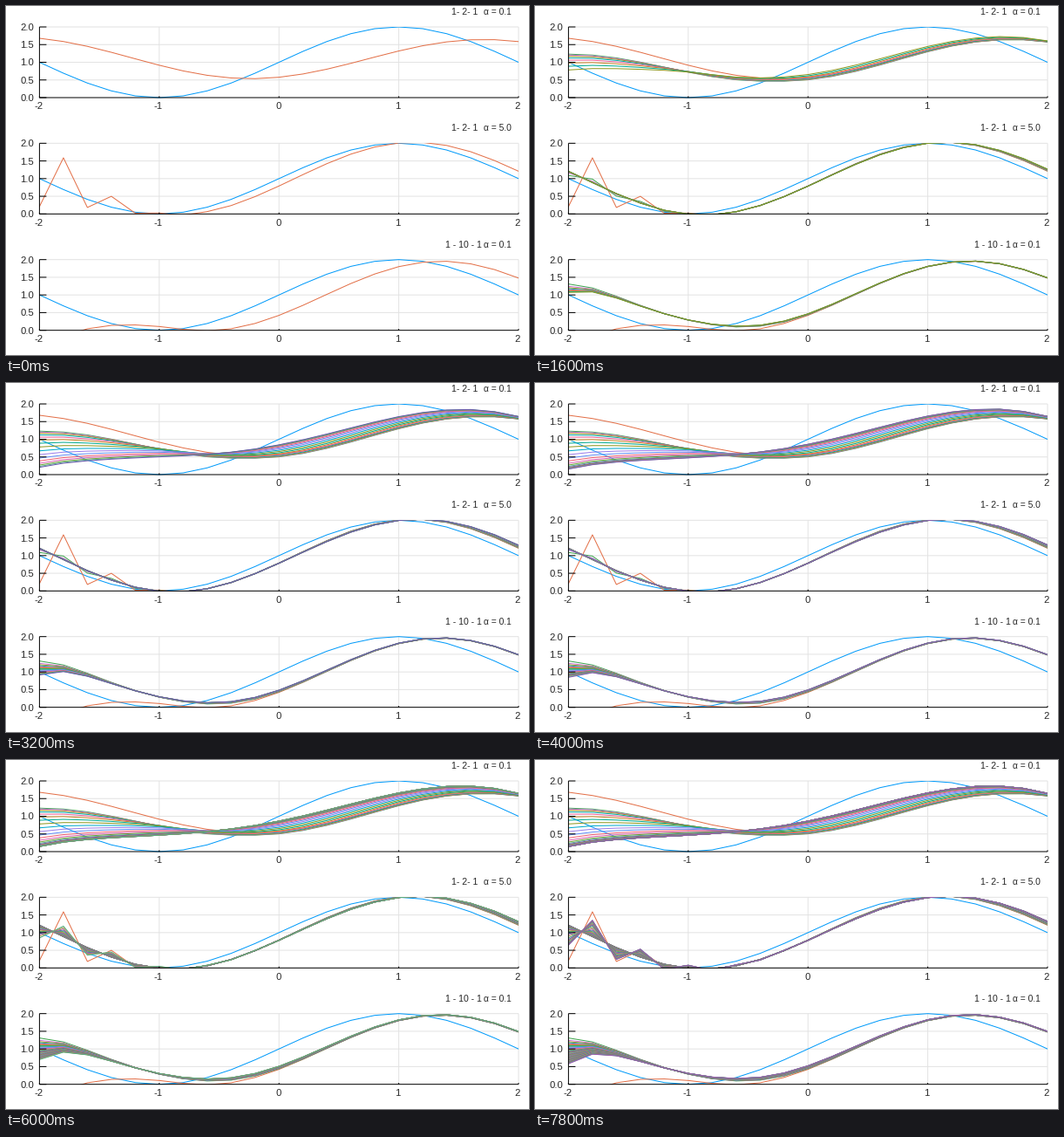
Animation, 600 px wide and 400 px high, one loop 8000 ms. Source, as a matplotlib script:

```python
import colorsys

import numpy as np
import matplotlib.pyplot as plt
from matplotlib.animation import FuncAnimation

W, H, DPI = 600, 400, 100
PX = 72 / DPI          # one pixel in points
FRAMES, STEP_MS = 40, 200
LEFT, WIDTH, HEIGHT = 38.4, 549.6, 81
FIRST_BASE, PITCH = 105, H / 3
PAD = 1 / HEIGHT       # half a pixel in y units, so peaks keep their full line

plt.rcParams["font.family"] = "Liberation Sans"
plt.rcParams["axes.unicode_minus"] = False

THEME = ("009afa e36f47 3ea44e c371d2 ac8e18 00aaae ed5e93 c68225 "
         "00a98d 8e971e 00a9cc 9b7fe9 618df6 f06073 dd65b6 6c9f33").split()

x = np.linspace(-2, 2, 21)
k = np.arange(x.size)
target = 1 + np.sin(np.pi * x / 2)


def line_color(i):
    if i < len(THEME):
        return "#" + THEME[i]
    return colorsys.hsv_to_rgb((0.175 + 0.265 * (i - 15)) % 1, 0.5, 0.68)


def bump(center, width):
    return np.exp(-((x - center) / width) ** 2)


def edge(width):
    return np.exp(-(x + 2) / width)


def wave(mean, amp, half_period, center):
    return mean + amp * np.sin(np.pi * (x - center) / half_period)


def zigzag(reach):
    return -(-1.0) ** k * np.exp(-(k / reach) ** 1.4)


def logistic(n, mid, width):
    return 1 / (1 + np.exp(-(n - mid) / width))


def slow_fit(n):
    """Small network, low rate: the left end sinks and flattens."""
    if n == 0:
        return wave(1.09, 0.555, 1.95, 0.735) + 0.015 * np.minimum(x, 0) ** 2
    start = wave(1.055, 0.59, 1.92, 0.74) - 0.235 * np.maximum(-0.3 - x, 0)
    end = (0.42 + 1.44 * bump(1.55, 1.43) - 0.28 * edge(0.35)
           - 0.3 * np.maximum(x - 1.5, 0) ** 2)
    first = logistic(1, 8.6, 2.6)
    s = (logistic(n, 8.6, 2.6) - first) / (1 - first)
    return start + s * (end - start) + 0.45 * s * (1 - s) * bump(-1, 0.45)


def fast_fit(n):
    """Small network, high rate: a zigzag grows back at the left end."""
    base = wave(1, 1.03, 2, 0.13)
    if n == 0:
        return base + zigzag(2.1)
    swing = 0.58 * logistic(n, 28.5, 3) + 0.12 * np.exp(1 - n)
    drift = np.sin(np.pi * (x - 1.15) / 1.7) * np.clip(x + 0.2, 0, 2) / 2
    return base + swing * zigzag(3.2) + 0.11 * (1 - np.exp(-n / 10)) * drift


def wide_fit(n):
    """Wide network, low rate: only the left end keeps sinking."""
    base = wave(0.97, 0.985, 1.97, 0.37)
    if n == 0:
        return base - 1.45 * np.maximum(-0.8 - x, 0) ** 2
    start = base + 0.13 * bump(-0.85, 0.6) - 0.25 * edge(0.2)
    q = ((n - 1) / 38) ** 0.66
    return start + q * (0.02 + 0.07 * bump(-0.2, 0.8) - 0.75 * edge(0.28))


def label(px, py, text, size=11.2, **kw):
    fig.text(px / W, 1 - py / H, text, fontsize=size * PX, color="#262626",
             va="baseline", **kw)


def make_panel(row, fit, shape, shape_x, rate):
    base = FIRST_BASE + row * PITCH
    ax = fig.add_axes([LEFT / W, 1 - (base + 0.5) / H, WIDTH / W, (HEIGHT + 1) / H])
    ax.set(xlim=(-2, 2), ylim=(-PAD, 2 + PAD))
    ax.axis("off")

    def rule(xs, ys, color="black", zorder=5):
        ax.plot(xs, ys, color=color, zorder=zorder, lw=PX, clip_on=False,
                snap=False, solid_capstyle="butt")

    for v in range(-1, 3):
        rule([v, v], [0, 2], "#e3e3e3", 1)
    for v in (0.5, 1, 1.5, 2):
        rule([-2, 2], [v, v], "#e3e3e3", 1)

    lines = []
    for i in range(FRAMES + 1):
        y = target if i == 0 else fit(i - 1)
        lines += ax.plot(x, y, color=line_color(i), lw=PX, zorder=3 + i / 100)

    rule([-2, -2, 2], [2, 0, 0])
    for v in range(-2, 3):
        rule([v, v], [0, 0.04])
        label(LEFT + (v + 2) * WIDTH / 4 - 1, base + 13.2, str(v), ha="center")
    for v in np.arange(5) / 2:
        rule([-2, -2 + 8 * 4 / WIDTH], [v, v])
        label(32.2, base - v * HEIGHT / 2 + 4, f"{v:.1f}", ha="right")

    label(shape_x, base - 95, shape, 10.5)
    label(548.5, base - 95, f"α = {rate}", 10.3)
    return lines


fig = plt.figure(figsize=(W / DPI, H / DPI), dpi=DPI, facecolor="white")
panels = [
    make_panel(0, slow_fit, "1- 2- 1", 511, "0.1"),
    make_panel(1, fast_fit, "1- 2- 1", 511, "5.0"),
    make_panel(2, wide_fit, "1 - 10 - 1", 504, "0.1"),
]


def draw(frame):
    for lines in panels:
        for i, line in enumerate(lines):
            line.set_visible(i <= frame + 1)
    return [line for lines in panels for line in lines]


anim = FuncAnimation(fig, draw, frames=FRAMES, interval=STEP_MS,
                     init_func=lambda: draw(0), repeat=True, repeat_delay=0, blit=False)
plt.show()
```
